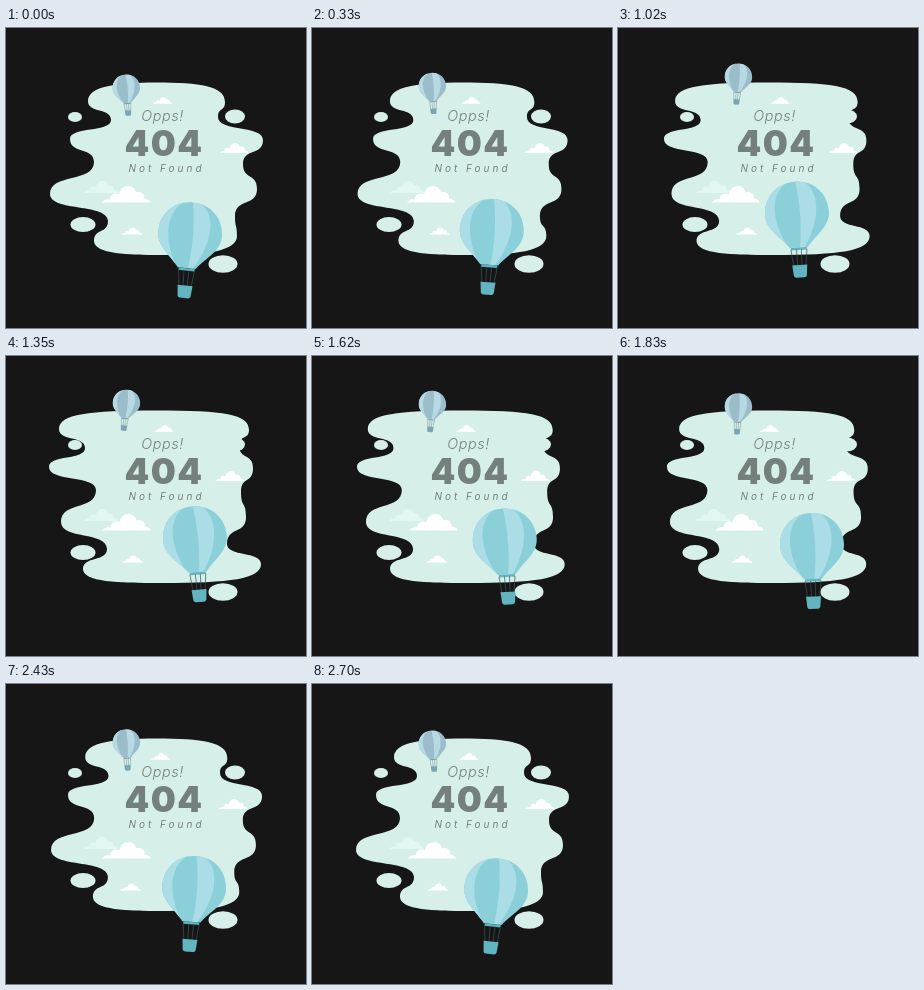
Write an HTML page that moves like this. It is 300 px wide and 300 px high and loops after 2.73 s.

```html
<!DOCTYPE html>
<html lang="en">
<head>
<meta charset="utf-8">
<title>404</title>
<style>
  html, body { margin: 0; width: 100%; height: 100%; overflow: hidden; background: #161616; }
  svg { display: block; width: 100vw; height: 100vh; }
  text { font-family: Inter, "Open Sans", sans-serif; fill: #74807b; text-anchor: middle; }
</style>
</head>
<body>
<svg viewBox="0 0 300 300">
  <defs>
    <path id="cloud" d="M-24 0C-22-3-19-4-16-3C-16-9-10-10-7-8C-5-19 8-19 10-10C16-12 19-7 18-4C21-4 24-2 24 0Z"/>
    <path id="envelope" d="M0-32C19-32 32-18 32 0C32 15 17 23 9 34H-9C-17 23-32 15-32 0C-32-18-19-32 0-32Z"/>
    <clipPath id="skin"><use href="#envelope"/></clipPath>
  </defs>
  <g fill="#d6f0e9">
    <path id="blob"/>
    <ellipse cx="69" cy="89" rx="7" ry="5"/>
    <ellipse cx="229" cy="88.5" rx="10" ry="7"/>
    <ellipse cx="77" cy="196.5" rx="12.5" ry="7.5"/>
    <ellipse cx="217" cy="236" rx="14.5" ry="8.8"/>
  </g>
  <g id="scene"></g>
  <text x="156.5" y="93" font-size="14.4" font-weight="300" font-style="italic" letter-spacing=".6">Opps!</text>
  <text x="158" y="128" font-size="35.3" font-weight="900" letter-spacing="1.4">404</text>
  <text x="160.5" y="144" font-size="10" font-weight="400" font-style="italic" letter-spacing="3">Not Found</text>
</svg>
<script>
const STEP = 30, STEPS = 91, CYCLE = 2700;
const blob = document.getElementById('blob');
const scene = document.getElementById('scene');

// Tips and notches, from the bottom left up and the top right down: [x at rest, x stretched, y]
const left = [[88, 77, 213], [102, 101, 193], [44, 55, 166], [88, 90, 134], [64, 43, 111], [105, 79, 92], [82, 53, 73]];
const right = [[219, 243, 74], [212, 233, 89], [257, 247, 112], [237, 235, 136], [251, 240, 161], [229, 221, 188], [231, 255, 208]];

const mix = (a, b, p) => a + (b - a) * p;

function blobPath(p) {
  const place = ([a, b, y]) => [mix(a, b, p), y];
  const side = points => points.slice(1).map(([x, y], i) => {
    const [px, py] = points[i], h = (y - py) * .66;
    return `C${px} ${py + h} ${x} ${y - h} ${x} ${y}`;
  }).join('');
  const l = left.map(place), r = right.map(place);
  const [tl, tr, br, bl] = [l[6], r[0], r[6], l[0]];
  return `M${bl}${side(l)}C${tl[0]} 58 ${tl[0] + 30} 54.5 150 54.5` +
    `C${tr[0] - 25} 54.5 ${tr[0]} 58 ${tr}${side(r)}` +
    `C${br[0]} 223 ${br[0] - 30} 227 155 227C${bl[0] + 35} 227 ${bl[0]} 226 ${bl}Z`;
}

// Smooth cyclic curve through values at these times
const times = [0, 630, 1020, 1350, 1830, 2220];
function drift(values, t) {
  const n = times.length;
  const time = i => times[(i + n) % n] + Math.floor(i / n) * CYCLE;
  const value = i => values[(i + n) % n];
  const slope = i => (value(i + 1) - value(i - 1)) / (time(i + 1) - time(i - 1));
  const i = times.findLastIndex(k => k <= t);
  const d = time(i + 1) - time(i), u = (t - time(i)) / d, v = 1 - u;
  return value(i) * v * v * (1 + 2 * u) + value(i + 1) * u * u * (3 - 2 * u) +
    d * u * v * (slope(i) * v - slope(i + 1) * u);
}

function add(markup) {
  const g = document.createElementNS('http://www.w3.org/2000/svg', 'g');
  g.innerHTML = markup;
  return scene.appendChild(g);
}

const clouds = [
  { xs: [95, 95.5, 95.7, 95, 94.5, 94.5], y: 165, size: .72, fill: '#e2f7f1' },
  { xs: [120, 118, 117.7, 120.5, 121.5, 120.5], y: 174.5, size: 1, fill: '#fff' },
  { xs: [156.5, 161, 162, 158, 151.5, 153], y: 75.7, size: .4, fill: '#fff' },
  { xs: [228, 225.3, 225, 223.8, 222.7, 225.4], y: 125, size: .6, fill: '#fff' },
  { xs: [125.8, 128.5, 128.7, 126.5, 123.7, 124], y: 206.5, size: .43, fill: '#fff' }
].map(c => ({ ...c, node: add(`<use href="#cloud" fill="${c.fill}"/>`) }));

const balloon = (dark, light, basket) => add(`
  <use href="#envelope" fill="${dark}"/>
  <g clip-path="url(#skin)" fill="${light}">
    <path d="M-32-32H-7C-25-24-28 6-9 35H-32Z"/>
    <path d="M0-32C4-10 4 15 1 35H5C19 15 28-18 8-32Z"/>
  </g>
  <path d="M-8 34H8V36.5H-8Z" fill="${basket}"/>
  <path d="M-8 36L-6 53M8 36L6 53M-2.5 36L-2 53M2.5 36L2 53" stroke="#39545a" stroke-width=".7" fill="none"/>
  <path d="M-7.5 51.5H7.5L6.5 62Q6 64 4 64H-4Q-6 64-6.5 62Z" fill="${basket}"/>`);

const small = balloon('#9bbdca', '#b6d9e4', '#7ba5b1');
const big = balloon('#8bcfd9', '#abdde7', '#62b5c0');
const bigXs = [184, 177, 179, 189, 194, 191];

const pose = (node, x, y, angle, size) =>
  node.setAttribute('transform', `translate(${x} ${y}) rotate(${angle}) scale(${size})`);

function draw(now) {
  const t = Math.floor(now / STEP) % STEPS * STEP % CYCLE;
  const swing = Math.cos(2 * Math.PI * t / CYCLE), p = (1 - swing) / 2;
  blob.setAttribute('d', blobPath(p));
  for (const c of clouds) pose(c.node, drift(c.xs, t), c.y, 0, c.size);
  pose(small, 120.4, mix(60.3, 47.4, p), 1 - 5 * swing, .43);
  pose(big, drift(bigXs, t), mix(206.3, 182.2, p), .5 + 5 * swing, 1);
}

const start = performance.now();
function tick() {
  draw(performance.now() - start);
  requestAnimationFrame(tick);
}
tick();
</script>
</body>
</html>
```
